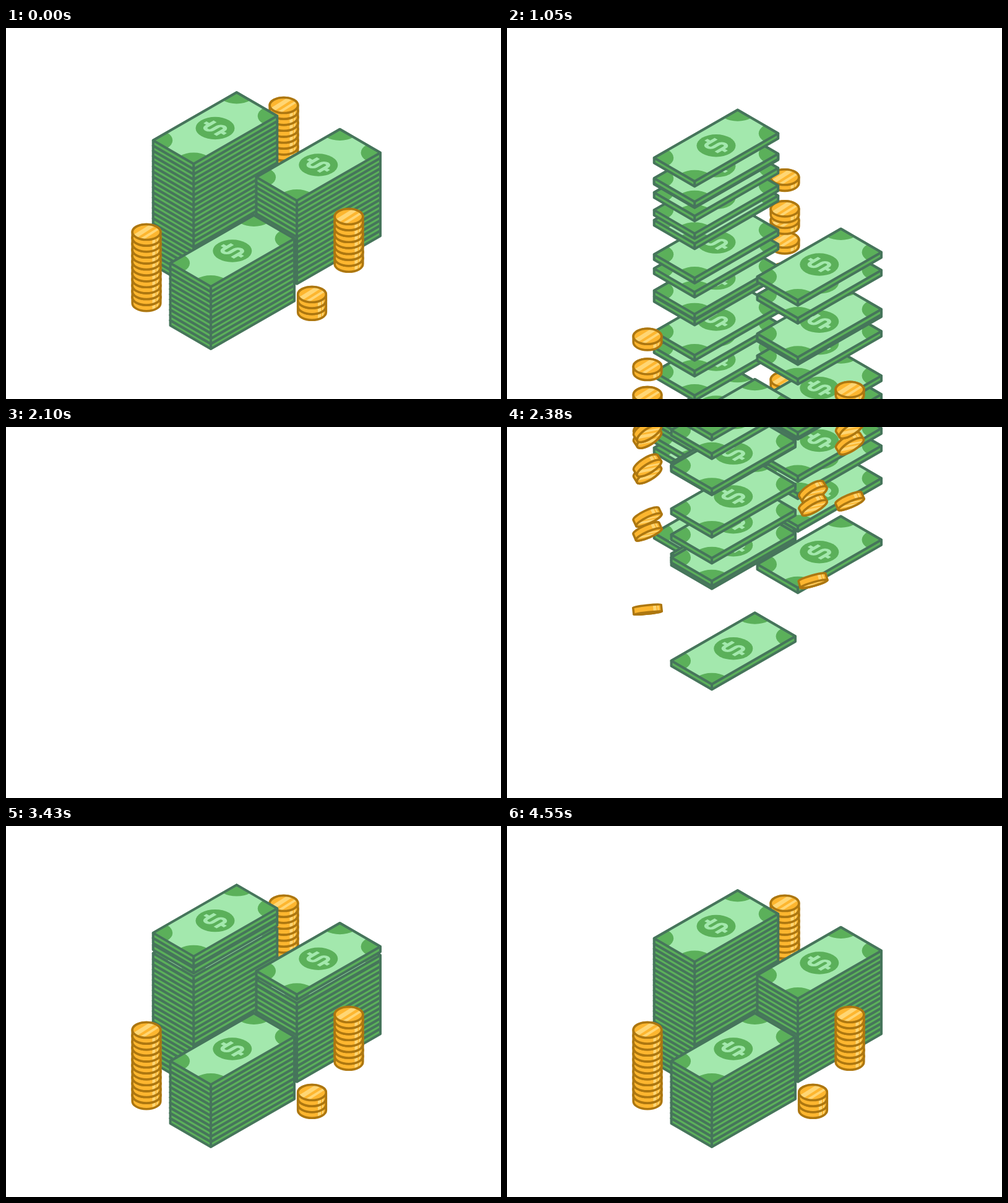
An HTML page with a canvas that plays this animation: 800x600 px, repeating every 4620 ms.

```html
<!DOCTYPE html>
<html lang="en">
<head>
<meta charset="utf-8">
<title>Money stacks</title>
<style>
  html, body { margin: 0; height: 100%; overflow: hidden; background: #fff; }
  canvas { display: block; }
</style>
</head>
<body>
<canvas id="stage" width="800" height="600"></canvas>
<script>
const ctx = document.getElementById('stage').getContext('2d');
const LOOP = 4620, FRAME = 70, DROP = 600, GRAVITY = 0.0024;
const BILL_H = 8.4, COIN_H = 9.6;
const GREEN = '#5bb05a', DARK = '#46755b', PALE = '#a3e8ad';
const GOLD = '#fdb62f', BROWN = '#ad7710', SHINE = '#ffd674';

// x, y: centre of the top face; n: pieces; first: pieces in the first wave;
// lag: delay of the stack's arrival in ms
const stacks = [
  { x: 449, y: 125, n: 14, first: 13, lag: 20, coin: true },
  { x: 338, y: 162, n: 24, first: 17, lag: 31 },
  { x: 504.8, y: 221.5, n: 16, first: 11, lag: 14 },
  { x: 227, y: 330, n: 12, first: 11, lag: 14, coin: true },
  { x: 365.8, y: 360.5, n: 12, first: 12, lag: 0 },
  { x: 554, y: 305, n: 8, first: 6, lag: 48, coin: true },
  { x: 494.5, y: 431, n: 3, first: 3, lag: 32, coin: true }
];

// Bill corners around the centre of its top face
const BACK = [34.75, -57.75], RIGHT = [100.25, -19.75];
const FRONT = [-34.75, 57.75], LEFT = [-100.25, 19.75];
const down = ([x, y]) => [x, y + BILL_H];

function noise(i, s) {
  const v = Math.sin(i * 12.9898 + s * 78.233) * 43758.5453;
  return (v - Math.floor(v)) * 2 - 1;
}

function bounce(p) {
  if (p <= 0) return 0;
  if (p >= 1) return 1;
  const k = 7.5625, u = p * 2.75;
  if (u < 1) return k * p * p;
  if (u < 2) return k * (p - 1.5 / 2.75) ** 2 + 0.75;
  if (u < 2.5) return k * (p - 2.25 / 2.75) ** 2 + 0.9375;
  return k * (p - 2.625 / 2.75) ** 2 + 0.984375;
}

function poly(points, closed = true) {
  ctx.beginPath();
  points.forEach(([x, y]) => ctx.lineTo(x, y));
  if (closed) ctx.closePath();
}

function oval(x, y, rx, ry) {
  ctx.beginPath();
  ctx.ellipse(x, y, rx, ry, 0, 0, 7);
}

function dollar() {
  ctx.save();
  ctx.transform(0.866, -0.5, 0.866, 0.5, 0, 0);
  ctx.beginPath();
  ctx.moveTo(11, -11);
  ctx.lineTo(-5, -11);
  ctx.arc(-5, -5.5, 5.5, -Math.PI / 2, Math.PI / 2, true);
  ctx.lineTo(5, 0);
  ctx.arc(5, 5.5, 5.5, -Math.PI / 2, Math.PI / 2);
  ctx.lineTo(-11, 11);
  ctx.moveTo(0, -19);
  ctx.lineTo(0, -11);
  ctx.moveTo(0, 11);
  ctx.lineTo(0, 19);
  ctx.strokeStyle = PALE;
  ctx.lineWidth = 5.6;
  ctx.stroke();
  ctx.restore();
}

function bill() {
  const top = [BACK, RIGHT, FRONT, LEFT];
  ctx.lineJoin = 'round';
  poly([BACK, RIGHT, down(RIGHT), down(FRONT), down(LEFT), LEFT]);
  ctx.fillStyle = GREEN;
  ctx.fill();
  ctx.strokeStyle = DARK;
  ctx.lineWidth = 4;
  ctx.stroke();
  poly([FRONT, down(FRONT)], false);
  ctx.stroke();

  ctx.save();
  poly(top);
  ctx.clip();
  ctx.fillStyle = PALE;
  ctx.fill();
  ctx.fillStyle = GREEN;
  for (const [x, y] of [[0, 0], ...top]) {
    oval(x, y, 31.5, 18.2);
    ctx.fill();
  }
  dollar();
  ctx.restore();

  poly(top);
  ctx.strokeStyle = DARK;
  ctx.stroke();
}

// turn: PI/2 lies flat with the face up, 0 is edge-on, below 0 shows the underside
function coin(turn) {
  const tilt = Math.sin(turn), rx = 22.8, ry = Math.max(0.6, Math.abs(tilt) * 12.5);
  const half = (11.6 - 2 * Math.abs(tilt)) / 2, side = tilt < 0 ? -1 : 1;
  ctx.save();
  ctx.translate(0, COIN_H / 2);
  ctx.rotate(0.58 * Math.sin(2 * turn));
  ctx.scale(1, side);
  ctx.lineJoin = 'round';
  ctx.lineWidth = 3.6;
  ctx.strokeStyle = BROWN;

  const rim = new Path2D();
  rim.ellipse(0, -half, rx, ry, 0, Math.PI, 0);
  rim.ellipse(0, half, rx, ry, 0, 0, Math.PI);
  rim.closePath();
  ctx.fillStyle = GOLD;
  ctx.fill(rim);
  ctx.save();
  ctx.clip(rim);
  ctx.fillStyle = SHINE;
  ctx.fillRect(9.5, -30, 5, 60);
  ctx.fillRect(16.5, -30, 2, 60);
  ctx.restore();
  ctx.stroke(rim);

  const face = new Path2D();
  face.ellipse(0, -half, rx, ry, 0, 0, 7);
  ctx.fillStyle = GOLD;
  ctx.fill(face);
  ctx.save();
  ctx.clip(face);
  ctx.translate(0, -half);
  ctx.scale(1, ry / 12.5);
  ctx.fillStyle = SHINE;
  poly([[-22, 5], [7, -13], [16, -11], [-15, 9]]);
  ctx.fill();
  poly([[-11, 11], [20, -8], [22, -5], [-6, 13]]);
  ctx.fill();
  ctx.restore();
  ctx.stroke(face);
  ctx.restore();
}

// Offset from the resting place, and the coin's turn
function pose(stack, s, i, t) {
  const j = noise(i, s);
  if (t < 1960) {
    const start = stack.coin ? 560 + 20 * i + 10 * j : 500 + 19 * i + 18 * j;
    return { dy: GRAVITY * Math.max(0, t - start) ** 2, turn: Math.PI / 2 };
  }
  const k = i - stack.first, late = k >= 0;
  const start = late ? 2596 + 1.5 * k : 2108 + stack.lag + (i ? 30 + 7.5 * i + 12 * j : 0);
  const p = (t - start) / (late ? 790 + 14 * k : 815);
  const turn = (p - 0.33) * 7 + (late ? 0.85 : 0);
  return {
    dy: DROP * (bounce(p) - 1),
    turn: Math.max(-0.8, Math.min(Math.PI / 2, turn))
  };
}

function draw(t) {
  ctx.clearRect(0, 0, 800, 600);
  if (t >= 1400 && t < 1960) return;
  stacks.forEach((stack, s) => {
    const step = stack.coin ? COIN_H : BILL_H;
    for (let i = 0; i < stack.n; i++) {
      const { dy, turn } = pose(stack, s, i, t);
      const y = stack.y + step * (stack.n - 1 - i) + dy;
      if (y < -90 || y > 690) continue;
      ctx.save();
      ctx.translate(stack.x, y);
      if (stack.coin) coin(turn);
      else bill();
      ctx.restore();
    }
  });
}

function tick() {
  const t = performance.now() % LOOP;
  draw(Math.floor(t / FRAME) * FRAME);
  requestAnimationFrame(tick);
}
tick();
</script>
</body>
</html>
```
